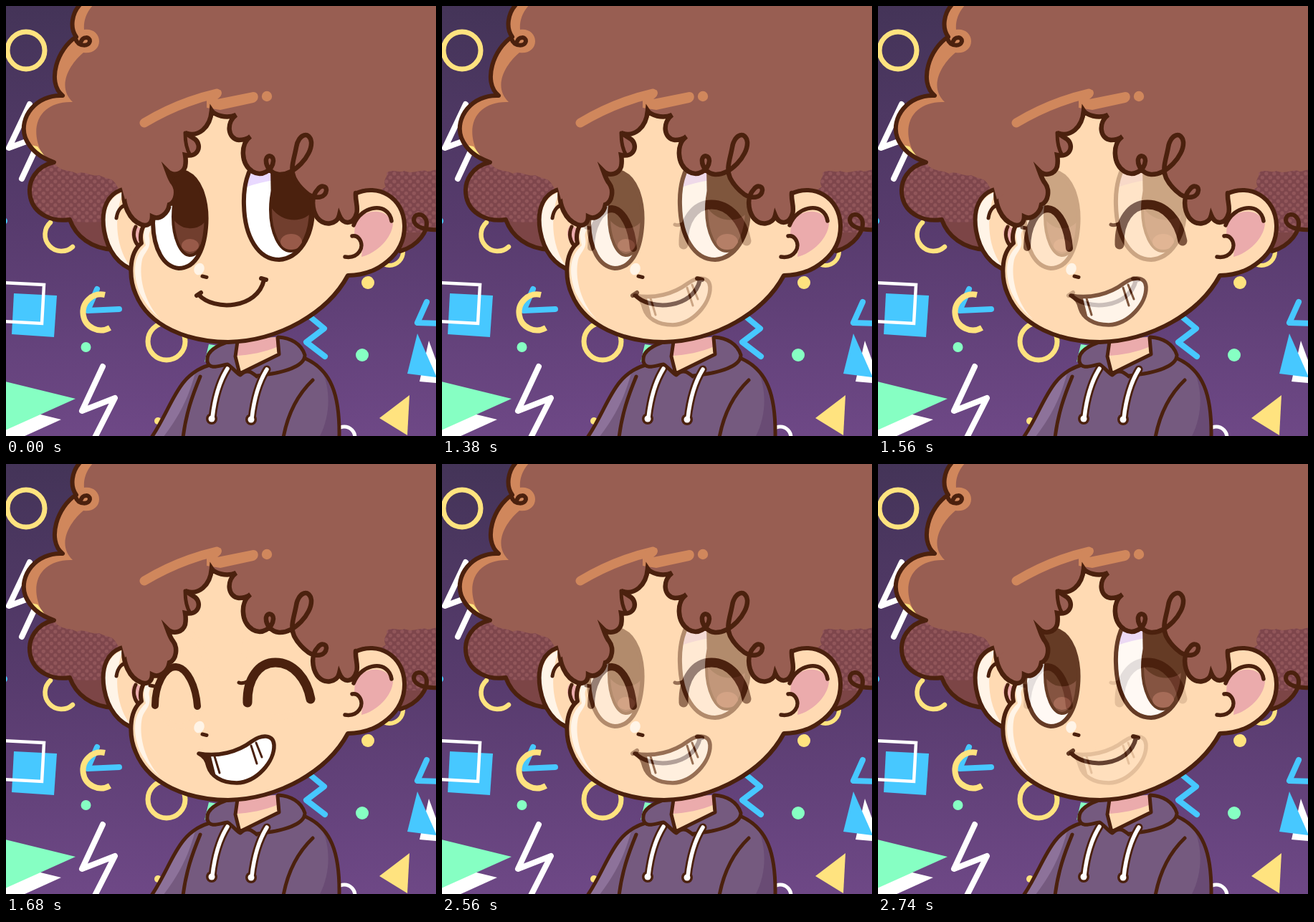
Animation of 600 by 600 pixels, one loop 2800 ms. Source, as an HTML page:

```html
<!DOCTYPE html>
<html lang="en">
<head>
<meta charset="utf-8">
<title>Curly hair portrait</title>
<style>
  html, body { margin: 0; width: 100%; height: 100%; overflow: hidden; background: #58406f; }
  svg { display: block; width: 100vw; height: 100vh; }
  .line { fill: none; stroke: #4b210e; stroke-width: 6; stroke-linecap: round; stroke-linejoin: round; }
  .thin { stroke-width: 5; }
  .sharp { stroke-linejoin: miter; stroke-miterlimit: 5; }
  .ink { fill: #4b210e; }
  .hair { fill: #985e52; }
  .skin { fill: #ffdab3; }
  .shine { fill: #d0875c; }
  .glow { fill: #fff4e7; }
  .pink { fill: #ebabac; }
  .yellow { fill: #ffe37f; }
  .blue { fill: #47c8ff; }
  .green { fill: #86ffc3; }
  .white { fill: #fff; }
  .stroke { fill: none; stroke-width: 8; stroke-linecap: round; stroke-linejoin: round; }
  .sy { stroke: #ffe37f; }
  .sb { stroke: #47c8ff; }
  .sw { stroke: #fff; }
  .patch { fill: #ffdab3; stroke: #ffdab3; stroke-width: 8; stroke-linecap: round; }
</style>
</head>
<body>
<svg viewBox="0 0 600 600" preserveAspectRatio="none">
  <defs>
    <linearGradient id="sky" x2="0" y2="1">
      <stop offset="0" stop-color="#443458"/>
      <stop offset=".5" stop-color="#573b6d"/>
      <stop offset="1" stop-color="#6e4886"/>
    </linearGradient>
    <pattern id="dots" width="11" height="11" patternUnits="userSpaceOnUse">
      <rect width="11" height="11" fill="#7e464c"/>
      <g fill="#91565a"><circle cx="2.8" cy="2.8" r="2.6"/><circle cx="8.3" cy="8.3" r="2.6"/></g>
    </pattern>
    <path id="eyeL" d="M250 232C272 240 282 274 279 309C276 345 262 366 241 366C220 364 206 340 205 303C206 268 226 232 250 232Z"/>
    <path id="eyeR" d="M350 214C337 228 331 252 332 278C333 322 352 354 381 354C409 352 428 322 428 284C427 240 404 208 376 206C366 206 357 208 350 214Z"/>
    <clipPath id="clipL"><use href="#eyeL"/></clipPath>
    <clipPath id="clipR"><use href="#eyeR"/></clipPath>
    <path id="smile" d="M269 403C290 426 351 423 360 382"/>
    <path id="grin" d="M269 404C296 409 323 402 343 387C357 377 373 377 374 392C375 415 350 444 322 445C300 445 286 435 282 422C280 413 277 408 269 404Z"/>
    <clipPath id="clipGrin"><use href="#grin"/></clipPath>
    <path id="fringe" d="M165 256C162 276 172 299 189 305C198 308 204 303 204 294C214 299 226 290 228 277C238 273 240 256 233 247C229 242 228 238 225 230C234 239 247 234 250 224C251 219 251 214 250 208C268 212 274 195 264 186L250 177C268 184 285 170 287 146C291 152 307 158 321 152C307 163 309 185 325 187C332 187 337 185 341 182C327 192 327 220 344 231C357 239 372 229 373 216C373 208 364 207 363 214C362 224 370 234 381 235C402 236 427 209 426 190C424 174 408 178 405 197C402 214 396 226 402 240C407 250 414 257 422 263C434 270 446 267 447 257C447 250 439 250 435 256C425 266 427 284 434 295C444 308 462 305 465 292C471 307 485 304 489 290C492 281 487 272 488 261"/>
    <path id="mass" d="M105 -4C91 10 89 31 98 43C72 59 56 106 79 125C42 123 17 156 27 184C34 201 49 212 67 218"/>
    <path id="lump" d="M67 218C43 223 29 244 34 267C39 290 64 302 89 298C97 321 119 339 151 340"/>
    <path id="curl" d="M604 312C586 313 570 309 569 299C569 289 581 288 586 298C591 313 575 335 550 342"/>
    <path id="string" d="M309 506C297 525 291 548 288 574"/>
  </defs>

  <rect width="600" height="600" fill="url(#sky)"/>

  <!-- confetti -->
  <g>
    <circle class="stroke sy" cx="28" cy="62" r="26" style="stroke-width:7"/>
    <path class="white" d="M86 50H98V56H87Z"/>
    <path class="stroke sw" d="M33 137L4 198L50 181L22 241"/>
    <circle class="blue" cx="-3" cy="300" r="5"/>
    <path class="stroke sy" style="stroke-width:6.5" d="M62 302A23 23 0 1 0 93 336"/>
    <path class="blue" d="M11 401L71 404L67 462L8 458Z"/>
    <path class="stroke sw" style="stroke-width:4.5;stroke-linejoin:miter" d="M-5 386L53 389L50 443L-5 440"/>
    <path class="stroke sb" d="M127 395L114 425L158 423"/>
    <path class="stroke sy" style="stroke-linecap:butt" d="M138 403A25 25 0 1 0 145 449"/>
    <circle class="green" cx="111.500" cy="476" r="7"/>
    <path class="stroke sw" d="M135 503L106 565L152 547L124 602"/>
    <path class="white" d="M40 568L77 577L24 601H-2V585Z"/>
    <path class="green" d="M-1 524L97 548L-1 592Z"/>
    <circle class="stroke sy" cx="224" cy="468" r="26" style="stroke-width:7"/>
    <circle class="yellow" cx="212" cy="579" r="5"/>
    <path class="green" d="M283 472L296 474L277 497Z"/>
    <path class="stroke sb" d="M421 431L444 450L419 469L445 489"/>
    <circle class="yellow" cx="505" cy="386" r="9"/>
    <circle class="stroke sy" cx="535" cy="343" r="19" style="stroke-width:6"/>
    <path class="stroke sb" d="M587 413L574 442L606 443"/>
    <circle class="green" cx="497" cy="487" r="9"/>
    <path class="white" d="M590 467L577 524L612 527Z"/>
    <path class="blue" d="M574 457L560 513L601 518Z"/>
    <path class="yellow" d="M563 543L521 575L560 599Z"/>
    <circle class="stroke sw" cx="472" cy="602" r="15" style="stroke-width:5"/>
  </g>

  <!-- back hair -->
  <path d="M67 218C43 223 29 244 34 267C39 290 64 302 89 298C97 321 119 339 151 340L200 330V218Z" fill="url(#dots)"/>
  <path d="M88 299C105 304 120 300 140 302H200V340H151C119 339 97 321 88 299Z" fill="#7c4546"/>
  <path d="M500 215H604V312C586 313 592 315 586 316C579 330 566 338 550 342L500 330Z" fill="url(#dots)"/>
  <path d="M552 316H586C579 330 566 338 550 342Z" fill="#7c4546"/>
  <use href="#lump" class="line"/>
  <use href="#curl" class="line"/>

  <path class="hair" d="M105 -4C91 10 89 31 98 43C72 59 56 106 79 125C42 123 17 156 27 184C34 201 49 212 67 218C74 232 90 228 99 234C110 229 118 239 130 236C140 242 149 239 154 250L170 275H500L530 252C524 242 534 239 531 233C540 226 547 234 556 230C570 236 579 226 588 231L602 228V-4Z"/>
  <path class="shine" d="M105 -4H124C111 9 108 22 109 33C120 31 130 38 130 49C130 60 120 67 108 65C91 79 69 111 93 134C53 132 29 162 50 206C38 203 31 195 27 184C17 156 42 123 79 125C56 106 72 59 98 43C89 31 91 10 105 -4Z"/>
  <path class="yellow" d="M35 194L44 196L55 211C46 209 39 203 35 194Z"/>
  <use href="#mass" class="line"/>
  <path class="line" d="M97 46C101 57 116 57 117 49C117 42 107 43 105 49"/>

  <!-- neck and hoodie -->
  <path d="M203 602C232 560 238 514 284 501L418 492C453 508 466 541 465 602Z" fill="#755a7f"/>
  <path d="M441 509C460 524 466 552 465 602H437C452 574 454 538 441 509Z" fill="#694b74"/>
  <path d="M264 512C240 528 232 560 204 602H219C244 570 256 542 264 512Z" fill="#8d729a"/>
  <path class="line thin" d="M284 501C238 514 232 560 203 602M418 492C453 508 466 541 465 602M271 517C259 546 251 570 247 602M428 522C406 543 393 570 387 602"/>
  <path d="M315 466C291 474 279 484 281 496C284 509 299 501 309 500C315 504 322 513 327 515C337 506 344 512 350 516C377 515 419 505 417 487C412 471 397 463 379 462Z" fill="#755a7f"/>
  <path class="skin" d="M321 466L320 489L327 513L381 486L379 462Z"/>
  <path class="pink" d="M322 466L321 488C340 487 362 483 380 475V462Z"/>
  <path class="line thin" d="M315 467C291 474 279 484 281 496C284 509 299 501 309 500C316 504 321 512 327 515C337 505 344 512 350 517M380 462C397 463 412 471 417 487C417 503 387 512 350 516M323 468L320 489L326 513L381 486L379 463"/>
  <g id="strings">
    <use href="#string" class="line" style="stroke-width:11"/>
    <circle class="ink" cx="287" cy="576" r="8"/>
    <use href="#string" class="stroke sw" style="stroke-width:5.500"/>
    <circle class="white" cx="287" cy="576" r="4.500"/>
  </g>
  <use href="#strings" x="55" y="1"/>

  <!-- ears and head -->
  <path class="skin" d="M173 254C140 257 132 285 137 314C142 342 157 362 182 369L205 330V270Z"/>
  <path class="glow" d="M163 260C142 267 134 290 140 318C145 340 157 358 174 364C156 342 148 300 163 260Z"/>
  <path class="pink" d="M180 305C172 312 174 326 183 336L190 312Z"/>
  <path class="line" d="M173 254C140 257 132 285 137 314C142 342 157 362 180 369"/>
  <path class="line thin" d="M154 296C156 283 162 278 172 276M181 308C176 318 179 328 184 334"/>
  <path class="skin" d="M197 300C190 307 186 319 189 331C170 346 172 382 181 402C199 447 254 469 310 469C382 467 449 428 477 376C518 376 557 347 556 306C555 267 519 247 487 262L440 200L287 146L215 230Z"/>
  <path class="glow" d="M200 302C191 311 191 320 195 334C175 352 178 376 186 399C192 412 203 427 216 437C196 418 184 382 190 354C193 343 203 339 200 324C198 317 203 308 210 304Z"/>
  <path class="pink" d="M487 304C497 282 532 280 540 304C538 324 519 344 496 350C498 339 496 325 486 318Z"/>
  <path class="line" d="M197 300C190 307 186 319 189 331C170 346 172 382 181 402C199 447 254 469 310 469C382 467 449 428 477 376C518 376 557 347 556 306C555 267 519 247 487 262"/>
  <path class="line" style="stroke-width:5.500" d="M485 306C496 277 534 273 538 300M473 350C492 353 501 336 493 325C490 321 487 320 483 321"/>

  <!-- open face -->
  <g>
    <use href="#eyeL" class="white"/>
    <g clip-path="url(#clipL)">
      <path d="M200 225H290V238L232 258H200Z" fill="#e9d9ff"/>
      <ellipse cx="257" cy="294" rx="24" ry="54" fill="#713e2e" stroke="#4b210e" stroke-width="4"/>
      <path class="ink" d="M230 235H282V292C276 314 246 316 234 298Z"/>
      <ellipse cx="257" cy="334" rx="12" ry="9" fill="#985a49"/>
    </g>
    <use href="#eyeL" class="line"/>
    <use href="#eyeR" class="white"/>
    <g clip-path="url(#clipR)">
      <path d="M325 205H430V238C395 238 358 244 325 256Z" fill="#e9d9ff"/>
      <ellipse cx="397" cy="284" rx="28" ry="58" fill="#713e2e" stroke="#4b210e" stroke-width="4"/>
      <path class="ink" d="M369 225H430V280C424 303 386 306 370 281Z"/>
      <ellipse cx="398" cy="329" rx="15" ry="11" fill="#985a49"/>
    </g>
    <use href="#eyeR" class="line"/>
    <use href="#smile" class="line"/>
    <path class="line" d="M266 404L272 400M356 380L363 382"/>
  </g>

  <!-- laughing face, faded over the open one -->
  <g id="laugh" opacity="0">
    <use href="#eyeL" class="patch"/>
    <use href="#eyeR" class="patch"/>
    <use href="#smile" class="patch" style="stroke-width:10"/>
    <path class="patch" d="M266 404L272 400M356 380L363 382"/>
    <path class="line" style="stroke-width:10" d="M208 337C208 309 221 283 237 283C253 284 265 310 267 338"/>
    <path class="line thin" d="M201 309L212 311M325 305C329 307 334 305 338 303"/>
    <path class="line" style="stroke-width:13" d="M337 333C336 299 353 277 376 277C401 277 420 300 425 328"/>
    <use href="#grin" class="white"/>
    <path class="ink" clip-path="url(#clipGrin)" d="M265 400H284L294 440H270Z"/>
    <path class="line" style="stroke-width:3" d="M291 408L298 431M342 393L350 418M349 389L357 409"/>
    <use href="#grin" class="line" style="stroke-width:5.500"/>
  </g>

  <ellipse class="glow" cx="269.500" cy="367" rx="7" ry="8.500" transform="rotate(25 269.500 367)"/>
  <path class="line thin" d="M274 377L280 378.500"/>

  <!-- fringe -->
  <path id="fringeFill" class="hair"/>
  <path class="stroke" stroke="#d0875c" style="stroke-width:13" d="M193 163C220 147 255 131 294 122"/>
  <path class="shine" d="M280 122L299 117C303 121 300 126 295 130L345 120C354 120 354 133 345 135L299 145L280 142Z"/>
  <circle class="shine" cx="364" cy="126" r="7.200"/>
  <use href="#fringe" class="line sharp" style="stroke-width:6.5"/>
  <path class="line thin" d="M250 177C250 190 252 200 257 208"/>
  <path class="hair" d="M160 248H176V262L166 270Z"/>
</svg>
<script>
  const LOOP = 2800, STEP = 60, STEPS = 7;
  const FADE_IN = 1320, FADE_OUT = 2440;
  const byId = id => document.getElementById(id);
  const laugh = byId("laugh");

  // The fringe outline is open; its fill closes above the forehead.
  byId("fringeFill").setAttribute("d", byId("fringe").getAttribute("d") + "V120H165Z");

  function laughAt(t) {
    if (t < FADE_IN) return 0;
    const steps = from => Math.min(STEPS, Math.floor((t - from) / STEP) + 1);
    return (t < FADE_OUT ? steps(FADE_IN) : STEPS - steps(FADE_OUT)) / STEPS;
  }

  const start = performance.now();
  function draw() {
    laugh.setAttribute("opacity", laughAt((performance.now() - start) % LOOP));
    requestAnimationFrame(draw);
  }
  draw();
</script>
</body>
</html>
```
